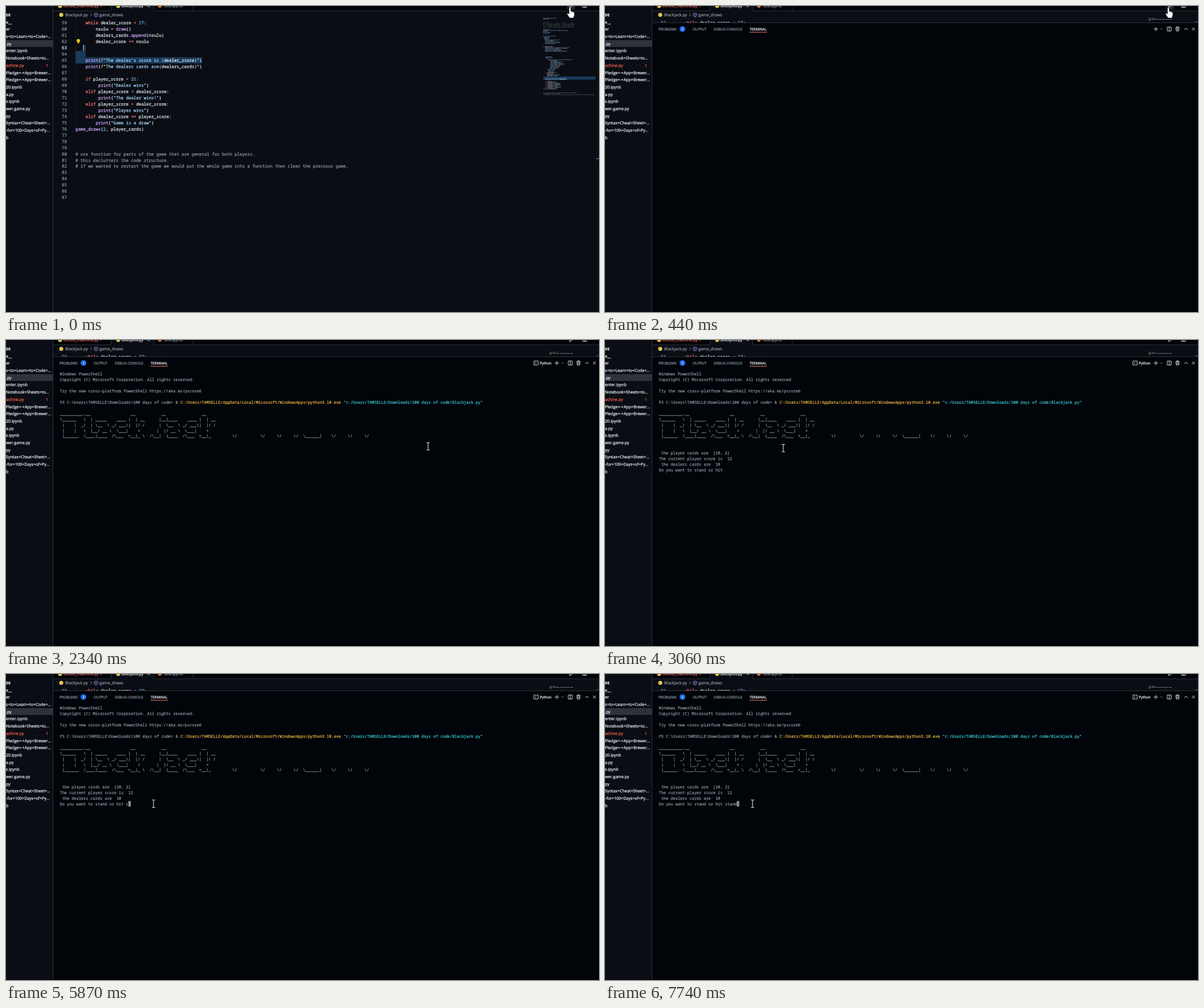
Write an HTML page with a canvas that moves like this. It is 1041x538 px and loops after 8 s.

```html
<!DOCTYPE html>
<html lang="en">
<head>
<meta charset="utf-8">
<title>Blackjack in the terminal</title>
<style>
html, body { margin: 0; width: 100%; height: 100%; overflow: hidden; background: #0a0d14; }
canvas { display: block; }
</style>
</head>
<body>
<canvas id="stage" width="1041" height="538"></canvas>
<script>
const c = document.getElementById('stage').getContext('2d');
const LOOP = 8000;
const UI = '"Open Sans", sans-serif', MONO = '"Noto Sans Mono", monospace';
const EDITOR = '#0a0d14', PANEL = '#010409', LINE = '#2b3037';
const GREY = '#8b949e', LIGHT = '#e6ebf0', RED = '#ff7b72', ERROR = '#f8614f', PYTHON = '#e3c34f';
const CODE_SIZE = 7.4, CODE_X = 122, CODE_PITCH = 10.96, FIRST_LINE = 59;
const TERM_SIZE = 6.917, TERM_X = 94.5, TERM_PITCH = 9.95;
c.textRendering = 'geometricPrecision';

const banner = String.raw`__________.__                 __           __               __
\______   \  | _____    ____ |  | __      |__|____    ____ |  | __
 |    |  _/  | \__  \ _/ ___\|  |/ /      |  \__  \ _/ ___\|  |/ /
 |    |   \  |__/ __ \  \___|    <       |  |/ __ \  \___|    <
 |______  /____(____  /\___  >__|_ \  /\__|  (____  /\___  >__|_         \/          \/     \/     \/  \______|    \/     \/     \/`.split('\n');

const code = `    while dealer_score < 17:
        nzulu = draw()
        dealers_cards.append(nzulu)
        dealer_score += nzulu


    print(f"The dealer's score is {dealer_score}")
    print(f"The dealers cards are{dealers_cards}")

    if player_score > 21:
         print("Dealer wins")
    elif player_score < dealer_score:
         print("The dealer wins!")
    elif player_score > dealer_score:
         print("Player wins")
    elif dealer_score == player_score:
        print("Game is a draw")
game_draws(2, player_cards)



# use function for parts of the game that are general for both players.
# this declutters the code structure.
# if we wanted to restart the game we would put the whole game into a function then clear the previous game.




`.split('\n').slice(0, 29);

const files = ['e__', 'er', 's+to+Learn+to+Code+…', '.py', 'enter.ipynb', 'Notebook+Sheets+to…', 'achine.py',
  'Pledge+-+App+Brewer…', 'Pledge+-+App+Brewer…', '20.ipynb', 'a.py', 's.ipynb', 'wer.game.py', 'py',
  'Syntax+Cheat+Sheet+…', '-for+100+Days+of+Py…', 'b'];

// Comment, keyword or operator, string, function, constant, anything else
const SYNTAX = /(#.*)|(\bf(?=")|\b(?:while|if|elif)\b|[<>=+]+)|((?<=})"|"[^"{]*"?)|(\w+(?=\())|(\d+|[{}])|(\w+|\S)/g;
const SYNTAX_COLORS = [GREY, RED, '#a5d6ff', '#d2a8ff', '#79c0ff', LIGHT];

function rect(x, y, w, h, color) {
  c.fillStyle = color;
  c.fillRect(x, y, w, h);
}
function dot(x, y, r, color) {
  c.fillStyle = color;
  c.beginPath();
  c.arc(x, y, r, 0, 7);
  c.fill();
}
// A hairline outline gives small type the weight of screen-hinted text
function text(str, x, y, color, size = 7.1, family = UI, style = '') {
  c.font = `${style} ${size}px ${family}`;
  c.fillStyle = c.strokeStyle = color;
  c.lineWidth = 0.25;
  c.fillText(str, x, y);
  c.strokeText(str, x, y);
}
function stroke(path, color = LIGHT, width = 0.9) {
  c.strokeStyle = color;
  c.lineWidth = width;
  c.stroke(new Path2D(path));
}
function tokens(line, put) {
  for (const m of line.matchAll(SYNTAX)) put(m.index, m[0], SYNTAX_COLORS[m.slice(1).findIndex(Boolean)]);
}
function stepAt(t, steps) {
  return steps.findLast(s => t >= s[0]);
}

function drawSidebar() {
  rect(0, 60, 82, 12, '#2e323a');
  text('DE', 0, 17.5, LIGHT, 6.2, UI, 'bold');
  files.forEach((name, i) => text(name, 0, 30.6 + i * 12.7, name === 'achine.py' ? ERROR : LIGHT));
  text('1', 70, 106.6, ERROR, 6.5);
  rect(82, 0, 1, 538, LINE);
}

function drawTabs(hover) {
  rect(83, 0, 958, 8, PANEL);
  rect(83, 8, 958, 1, LINE);
  rect(184, 0, 76, 9, EDITOR);
  for (const x of [184, 259, 328]) rect(x, 0, 1, 8, LINE);
  dot(95, 0, 3.5, PYTHON);
  text('coffee_machine.py', 101, 2.4, ERROR);
  text('1', 165, 2.4, ERROR, 6);
  dot(197, 0, 3.5, PYTHON);
  text('Blackjack.py', 203, 2.4, LIGHT, 7.1, UI, 'italic');
  stroke('M248.5-2l4 4M252.5-2l-4 4');
  dot(270, 0, 3, '#f37626');
  text('test.ipynb', 278, 2.4, GREY);
  if (hover) rect(985, 0, 14, 6, '#20252c');
  stroke('M989.5-4V3L994.5 0');
  stroke('M1012.5-4V2.5H1019V-4M1015.7-4V2.5');

  dot(97, 15.5, 3.6, PYTHON);
  text('Blackjack.py', 104, 18, GREY);
  stroke('M148 13l2.3 2.5L148 18', GREY);
  stroke('M158 12l3.2 1.7v3.8L158 19.2l-3.2-1.7v-3.8zM154.8 13.7l3.2 1.8l3.2-1.8M158 15.5v3.7', '#b083f0', 0.8);
  text('game_draws', 164, 18, GREY);
}

function drawMinimap() {
  const unit = 0.83, pitch = 1.66, left = 943;
  const row = n => 21 + (n - 1) * pitch;
  rect(left, 124, 92, 5.5, '#1a3a58');
  c.globalAlpha = 0.5;
  let seed = 7;
  const random = () => (seed = seed * 16807 % 2147483647) / 2147483647;
  // first line, last line, indent, greatest length
  const blocks = [[1, 1, 0, 28], [2, 2, 0, 12], [13, 13, 0, 15], [14, 14, 0, 52], [15, 17, 0, 18], [20, 20, 0, 26],
    [21, 23, 2, 16], [24, 28, 4, 34], [31, 31, 0, 22], [32, 36, 4, 56], [42, 43, 5, 22], [45, 45, 9, 52], [46, 54, 15, 30], [55, 58, 10, 20]];
  for (const [first, last, indent, length] of blocks)
    for (let n = first; n <= last; n++) {
      const end = indent + length * (first === last ? 1 : 0.5 + random() / 2);
      for (let col = indent; col < end;) {
        const size = Math.min(end - col, 2 + random() * 7);
        rect(left + col * unit, row(n), size * unit, 1, SYNTAX_COLORS[2 + Math.floor(random() * 4)]);
        col += size + 1;
      }
    }
  banner.forEach((line, i) => {
    for (const m of line.slice(0, 66).matchAll(/\S/g))
      rect(left + m.index * unit, row(5 + i * 1.25) + (m[0] === '_' ? 1 : 0), unit, m[0] === '_' ? 0.7 : 1.6, GREY);
  });
  code.forEach((line, i) => tokens(line, (col, word, color) =>
    word.split(' ').reduce((at, part) => {
      rect(left + at * unit, row(FIRST_LINE + i), part.length * unit, 1, color);
      return at + part.length + 1;
    }, col)));
  c.globalAlpha = 1;
}

function drawCode() {
  const advance = CODE_SIZE * 0.6, top = i => 24.3 + i * CODE_PITCH;
  const selection = '#1a3a58';
  rect(CODE_X, top(0), 0.7, 17 * CODE_PITCH, '#20252c');
  rect(CODE_X + 3 * advance, top(4), advance, CODE_PITCH, selection);
  rect(CODE_X, top(5), 4 * advance, CODE_PITCH, selection);
  rect(CODE_X, top(6), 50 * advance, CODE_PITCH, selection);
  for (const i of [5, 6])
    for (let col = 0; col < 4; col++) dot(CODE_X + (col + 0.5) * advance, top(i) + 5.5, 0.45, '#5b6673');
  code.forEach((line, i) => {
    const y = top(i) + 8.1;
    text(FIRST_LINE + i, 98, y, i === 4 ? LIGHT : GREY, CODE_SIZE, MONO);
    tokens(line, (col, word, color) => text(word, CODE_X + col * advance, y, color, CODE_SIZE, MONO));
  });
  dot(127, 61, 2.9, '#ffc91f');
  rect(125.6, 63.5, 2.8, 2.3, '#d8a914');
  rect(135.3, 68.2, 1.1, 10.5, '#9cc7f5');
}

function drawEditor(panelOpen) {
  c.save();
  c.beginPath();
  c.rect(83, 21, 958, panelOpen ? 8 : 517);
  c.clip();
  drawCode();
  if (panelOpen) {
    c.globalAlpha = 0.5;
    rect(954, 21, 4, 1, RED);
    rect(959, 21, 7, 1, GREY);
    for (let x = 954; x < 993; x += 6) rect(x, 23, 5, 1, LIGHT);
    rect(954, 25, 4, 1, RED);
    c.globalAlpha = 1;
    rect(1036, 27, 5, 1, '#2d5f93');
  } else {
    drawMinimap();
    rect(1036, 268, 5, 1, GREY);
  }
  c.restore();
}

function drawPanel(t) {
  rect(83, 29, 958, 509, PANEL);
  rect(83, 29, 958, 1, LINE);
  const label = (str, x, color = GREY) => text(str, x, 42.9, color, 6.1);
  label('PROBLEMS', 94);
  dot(136, 40.4, 5, '#1f6feb');
  text('1', 134.4, 42.6, '#fff', 5.8);
  label('OUTPUT', 154);
  label('DEBUG CONSOLE', 191);
  label('TERMINAL', 254, LIGHT);
  rect(253.5, 45.6, 31, 1, '#f78166');
  if (t >= 710) {
    stroke('M926.8 37h7.4v7h-7.4zM929 39l1.8 1.6l-1.8 1.6');
    text('Python', 937, 43, LIGHT, 6.3);
  }
  stroke('M963.3 40.5h7.4M967 36.8v7.4');
  stroke('M975 39.5l2 2l2-2', GREY);
  stroke('M987 37h7v7h-7zM990.5 37v7');
  stroke('M1001.5 38h7M1003.5 38v-1.3h3V38M1002.3 38l.5 6h4.4l.5-6M1004.2 39.5v3M1005.8 39.5v3');
  stroke('M1017 42l3-3l3 3');
  stroke('M1030.5 38l5 5M1035.5 38l-5 5');
  drawTerminal(t);
}

function drawTerminal(t) {
  const advance = TERM_SIZE * 0.6, base = row => 62 + row * TERM_PITCH;
  const print = (row, str, col = 0, color = GREY) => text(str, TERM_X + col * advance, base(row), color, TERM_SIZE, MONO);
  if (t >= 850) {
    print(0, 'Windows PowerShell');
    print(1, 'Copyright (C) Microsoft Corporation. All rights reserved.');
    print(3, 'Try the new cross-platform PowerShell https://aka.ms/pscore6');
  }
  if (t >= 1090) print(5, 'PS C:\\Users\\TAMSELLE\\Downloads\\100 days of code>');
  if (t >= 1880) {
    print(5, '&', 49);
    print(5, 'C:/Users/TAMSELLE/AppData/Local/Microsoft/WindowsApps/python3.10.exe', 51, '#e3b341');
    print(5, '"c:/Users/TAMSELLE/Downloads/100 days of code/Blackjack.py"', 120, '#39c5cf');
  }
  if (t >= 2340) banner.forEach((line, i) => print(7 + i, line));
  if (t >= 2490) {
    const [, typed] = stepAt(t, [[0, ''], [5870, 's'], [6020, 'sa'], [6270, 'sat'], [6560, 'sa'], [6710, 's'],
      [6860, 'st'], [7150, 'sta'], [7440, 'stan'], [7740, 'stand']]);
    const question = 'Do you want to stand or hit ' + typed;
    print(14, ' the player cards are  [10, 2]');
    print(15, 'The current player score is  12');
    print(16, ' the dealers cards are  10');
    print(17, question);
    if (t >= 4000) rect(TERM_X + question.length * advance, base(17) - 7.8, advance, 9.8, GREY);
  }
}

function drawPointer(t) {
  const [start, x, y] = stepAt(t, [[0, 990, 3], [300, 989, 3], [850, 930, 62], [970, 840, 125], [1090, 770, 172], [1210, 741, 187],
    [3060, 313, 190], [3210, 291, 179], [3330, 270, 204], [3450, 261, 230], [3570, 259, 228]]);
  c.save();
  c.translate(x, y);
  if (start < 850) {
    const hand = 'M-1.5 1Q0-1 1.5 1V6L6.5 7.5Q8 8.5 8 10L7.5 14L6 18H-.5L-4.5 12Q-5.5 10-4 9.5L-1.5 11Z';
    c.fillStyle = '#fff';
    c.fill(new Path2D(hand));
    stroke(hand, '#111', 0.6);
    stroke('M1.5 6V10M4 7V10.5M6.2 8V10.5', '#777', 0.5);
  } else {
    stroke('M-2.8-6.5H-.6L0-6L.6-6.5H2.8M0-6V6M-2.8 6.5H-.6L0 6L.6 6.5H2.8', '#e6e6e6', 1.1);
  }
  c.restore();
}

function frame(now) {
  const t = now % LOOP, panelOpen = t >= 440;
  rect(0, 0, 1041, 538, EDITOR);
  drawSidebar();
  drawTabs(t < 850);
  drawEditor(panelOpen);
  if (panelOpen) drawPanel(t);
  drawPointer(t);
  requestAnimationFrame(frame);
}
requestAnimationFrame(frame);
</script>
</body>
</html>
```
